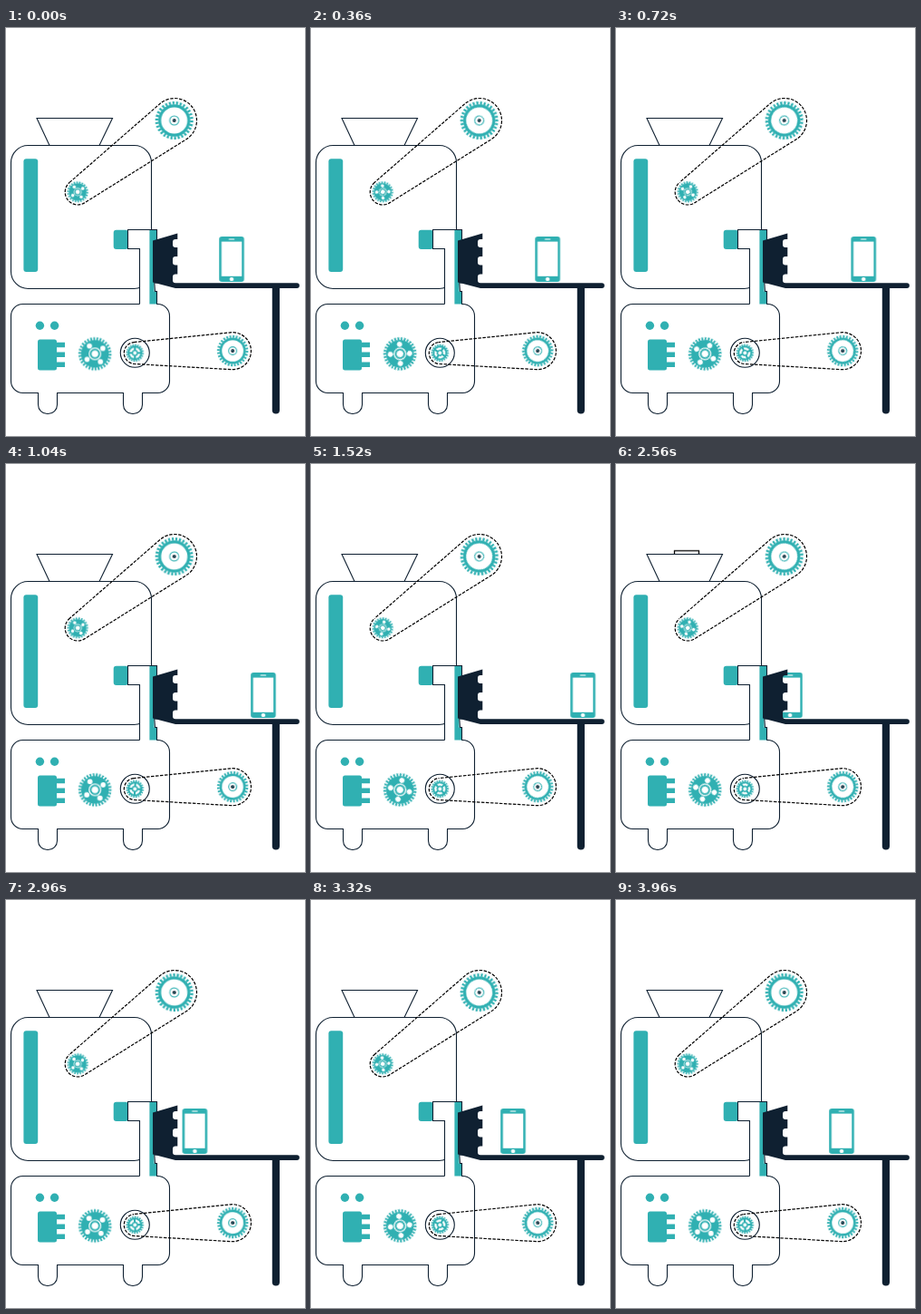
Animation, 330 px wide and 450 px high, one loop 4 s. Source, as an HTML page:

```html
<!DOCTYPE html>
<html lang="en">
<head>
<meta charset="utf-8">
<title>Document machine</title>
<style>
  html, body { margin: 0; width: 100%; height: 100%; overflow: hidden; background: #fff; }
  svg { display: block; width: 330px; height: 450px; }
  .teal { fill: #30b0b2; }
  .ink { fill: #0f2031; }
  .white { fill: #fff; }
  .line { fill: #fff; stroke: #0f2031; stroke-width: 1.1; }
  .open { fill: none; }
  .belt { fill: none; stroke: #000; stroke-width: 1.2; stroke-dasharray: 3.5 1.5; animation: run 4s linear infinite; }
  .teeth { fill: none; stroke: #30b0b2; }
  .ring { fill: #fff; stroke: #30b0b2; }
  .spin { animation: spin 4s linear infinite; transform-origin: 0 0; }
  .phone { animation: ride 4s linear infinite; transform-origin: 0 0; }
  .paper { animation: flutter 4s linear infinite; transform-origin: 0 0; }

  @keyframes spin { to { transform: rotate(360deg); } }
  @keyframes run { to { stroke-dashoffset: -150; } }
  @keyframes ride {
    0% { transform: translate(235.2px, 230px); }
    46% { transform: translate(297px, 230px); }
    46.01% { transform: translate(149px, 230px); }
    99%, 100% { transform: translate(235.2px, 230px); }
  }
  @keyframes flutter {
    0%, 44% { transform: translate(78px, 22.5px); visibility: hidden; animation-timing-function: ease-out; }
    44.01% { transform: translate(78px, 22.5px); visibility: visible; animation-timing-function: ease-out; }
    49% { transform: translate(104.5px, 39.5px) rotate(15deg); animation-timing-function: ease-in-out; }
    56% { transform: translate(52px, 35.8px) rotate(-15deg); animation-timing-function: ease-in; }
    64% { transform: translate(78px, 113px); visibility: visible; }
    66%, 100% { transform: translate(78px, 130px); visibility: hidden; }
  }
</style>
</head>
<body>
<svg viewBox="0 0 330 450">
  <defs>
    <clipPath id="exit"><rect x="184" y="200" width="146" height="100"/></clipPath>
  </defs>

  <g class="paper">
    <rect class="white" x="-13.5" y="-17.5" width="27" height="35" stroke="#000" stroke-width="1.3"/>
    <path d="M-9.8-12.4H9.8M-9.8-8.2H9.8M-9.8-4H9.8M-9.8.2H9.8M-9.8 4.4H0" stroke="#000" stroke-width="1.4"/>
  </g>

  <!-- machine -->
  <path class="line" d="M34 99.5H117.5L103 129.5H48Z"/>
  <rect class="line" x="5.5" y="129.5" width="155" height="158" rx="19"/>
  <rect class="teal" x="19.4" y="144.3" width="15.8" height="124.7" rx="3"/>
  <rect class="line" x="5.5" y="304.5" width="175" height="98" rx="13"/>
  <path class="line" d="M35.5 402V415.5a10 10 0 0 0 10 10h1a10 10 0 0 0 10-10V402M129.5 402V415.5a10 10 0 0 0 10 10h1a10 10 0 0 0 10-10V402"/>
  <path class="white" d="M36 401H56V403.5H36ZM130 401H150V403.5H130Z"/>
  <rect class="teal" x="118.7" y="222.7" width="16" height="21.3" rx="3"/>
  <path class="white" d="M134.5 222.5H166V305.5H147.5V243.5H134.5Z"/>
  <path class="teal" d="M158.4 223H166.5V281H163.5V290.5H166.5V304.5H158.4Z"/>
  <path class="white" d="M164 281H168V290H164Z"/>
  <path class="line open" d="M147.5 304.5V243.5H134.5V222.5H166.5V281H163.8L164.5 290.5H166.5V304.5"/>
  <circle class="teal" cx="37.4" cy="328.2" r="4.7"/>
  <circle class="teal" cx="53.6" cy="328.2" r="4.7"/>
  <rect class="teal" x="35" y="343.5" width="21" height="34" rx="2.5"/>
  <path class="teal" d="M54 346.8H65V352.3H54ZM54 357.5H65V363H54ZM54 368.5H65V374H54Z"/>

  <g clip-path="url(#exit)">
    <g class="phone">
      <rect class="teal" width="27.6" height="50" rx="3"/>
      <rect class="white" x="2.6" y="5.6" width="22.4" height="38.2"/>
      <rect class="white" x="10.5" y="2.6" width="6.5" height="1" rx=".5"/>
      <rect class="white" x="11.7" y="44.9" width="4.2" height="4" rx="1.5"/>
    </g>
  </g>

  <!-- claw and table -->
  <path class="ink" d="M162 234.5L189.3 226.5V233H187q-3 0-3 3v3q0 3 3 3h2.3V252H187q-3 0-3 3v3.5q0 3 3 3h2.3V271.5H187q-3 0-3 3v3.7q0 3 3 3H321a2.9 2.9 0 0 1 0 5.8H187L162 280.5Z"/>
  <path class="ink" d="M293.8 284H302V421.5a4.1 4.1 0 0 1-8.2 0Z"/>

  <circle class="line" cx="142.3" cy="358.3" r="16"/>
  <g id="drive"></g>
</svg>
<script>
  const drive = document.getElementById('drive');
  const circle = (cls, r, extra = '') => `<circle class="${cls}" r="${r}" ${extra}/>`;

  // Outer tangents around two pulleys, drawn clockwise.
  function belt(small, big) {
    const dx = big.x - small.x, dy = big.y - small.y;
    const heading = Math.atan2(dy, dx);
    const spread = Math.acos((small.r - big.r) / Math.hypot(dx, dy));
    const at = (c, a) => `${c.x + c.r * Math.cos(a)} ${c.y + c.r * Math.sin(a)}`;
    const up = heading - spread, down = heading + spread;
    return `<path class="belt" d="M${at(small, up)}L${at(big, up)}` +
      `A${big.r} ${big.r} 0 1 1 ${at(big, down)}L${at(small, down)}` +
      `A${small.r} ${small.r} 0 0 1 ${at(small, up)}"/>`;
  }

  function teeth(r, count, depth) {
    const root = r - depth;
    return circle('teal', root + 0.3) +
      circle('teeth', root + depth / 2,
        `stroke-width="${depth}" pathLength="${count * 2}" stroke-dasharray="1.1 .9"`);
  }

  const gear = (x, y, body) =>
    `<g transform="translate(${x} ${y})"><g class="spin">${body}</g></g>`;

  function holedGear(x, y, r, count) {
    let body = teeth(r, count, r * 0.18);
    for (let i = 0; i < 4; i++) {
      const a = (i * 90 - 35) * Math.PI / 180;
      body += circle('white', r * 0.155,
        `cx="${r * 0.58 * Math.sin(a)}" cy="${-r * 0.58 * Math.cos(a)}"`);
    }
    body += circle('white', r * 0.38) +
      circle('ring', r * 0.26, `stroke-width="${r * 0.11}"`);
    return gear(x, y, body);
  }

  function ringGear(x, y, r, count, hub) {
    return gear(x, y, teeth(r, count, r * 0.17) + circle('white', r * 0.69) +
      circle('ring', hub, 'stroke-width="1.1"') + circle('ink', 1.9) +
      '<path d="M-.9-.9L.5.5" stroke="#30b0b2" stroke-width=".8"/>');
  }

  function spokedGear(x, y, r, count) {
    return gear(x, y, teeth(r, count, r * 0.2) + circle('white', r * 0.62) +
      `<path d="M${-r * 0.65} 0H${r * 0.65}M0 ${-r * 0.65}V${r * 0.65}" stroke="#30b0b2" stroke-width="2.2"/>` +
      circle('ring', r * 0.28, 'stroke-width="1.6"'));
  }

  drive.innerHTML =
    belt({ x: 79.2, y: 181, r: 14 }, { x: 186, y: 102, r: 24.5 }) +
    belt({ x: 142.3, y: 358.5, r: 12 }, { x: 250, y: 356.2, r: 20.5 }) +
    ringGear(185.7, 102, 21, 30, 5) +
    ringGear(250.2, 356.1, 17.2, 28, 4.4) +
    holedGear(79.2, 180.8, 11.6, 22) +
    holedGear(98.2, 359.4, 18.3, 30) +
    spokedGear(142.3, 358.4, 9.8, 20);
</script>
</body>
</html>
```
